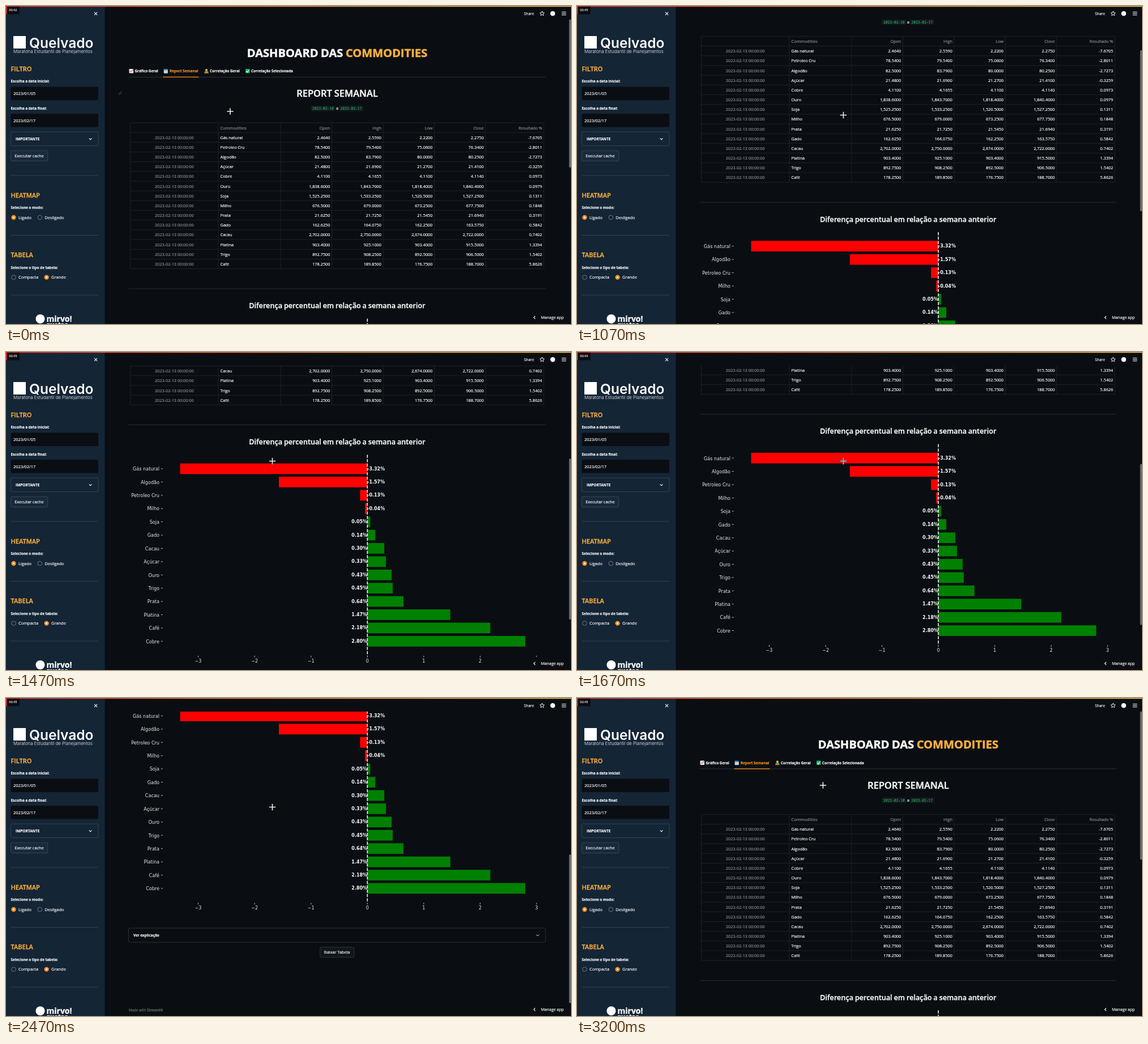
Recreate the animation shown at these times as an HTML page. Size 998 px wide and 561 px high, loop 3.26 s.

```html
<!DOCTYPE html>
<html lang="pt">
<head>
<meta charset="utf-8">
<title>Dashboard das Commodities</title>
<style>
html, body { margin: 0; width: 100%; height: 100%; overflow: hidden; background: #0a0e12 }
svg { display: block; width: 100%; height: 100% }
text { font-family: "Open Sans", "Noto Sans", sans-serif; white-space: pre; word-spacing: -.035em; color: #fafafa }
text, tspan { fill: currentColor; stroke: currentColor; stroke-width: .025em }
.plot, .geo { stroke: none; word-spacing: 0 }
.plot { font-family: "DejaVu Sans", sans-serif }
.mono { font-family: "Noto Sans Mono", monospace }
.geo { font-family: Inter, sans-serif }
#cursor { mix-blend-mode: difference }
</style>
</head>
<body>
<svg viewBox="0 0 998 561">
  <rect width="998" height="561" fill="#0a0e12"/>
  <g id="page"></g>
  <rect id="thumb" x="994.6" y="1" width="3.4" height="284" rx="1.5" fill="#6b6e71"/>
  <g id="frame"></g>
  <path id="cursor" d="M-5.7 0H5.7M0-5.7V5.7" stroke="#fff" stroke-width="1.6"/>
</svg>
<script>
const BG = '#0a0e12', ORANGE = '#ffb13c', ACCENT = '#ff8f22', WHITE = '#fafafa', GRAY = '#8b8f94';
const $ = id => document.getElementById(id);
let out = '';

// y is the middle of the capital letters
const text = (x, y, str, size = 7.4, attrs = '') =>
  out += `<text x="${x}" y="${y + size * .36}" font-size="${size}" ${attrs}>${str}</text>`;
const rect = (x, y, w, h, fill, attrs = '') =>
  out += `<rect x="${x}" y="${y}" width="${w}" height="${h}" fill="${fill}" ${attrs}/>`;
const path = (d, stroke = WHITE, width = 1, attrs = '') =>
  out += `<path d="${d}" fill="none" stroke="${stroke}" stroke-width="${width}" ${attrs}/>`;
const dot = (x, y, r, fill, attrs = '') =>
  out += `<circle cx="${x}" cy="${y}" r="${r}" fill="${fill}" ${attrs}/>`;
const flush = id => { $(id).innerHTML = out; out = ''; };

const ink = color => `style="color:${color}" `;
const bold = 'font-weight="700" ', semi = 'font-weight="600" ';
const middle = 'text-anchor="middle" ', end = 'text-anchor="end" ';
const box = (x, y, w, h, color = 'none') =>
  rect(x, y, w, h, color, 'rx="2" stroke="#fff" stroke-opacity=".2" stroke-width=".7"');

function drawTabs() {
  path('M216.5 125.5H953', '#30343a', .9);
  path('M277.5 125.3H340.5', ACCENT, 1.2);
  rect(217.5, 111, 7.6, 7.6, '#e6e9ec', 'rx=".8"');
  path('M218.5 117l2-2.5 1.5 1 2.5-3.5', '#d8323c', 1);
  rect(278.7, 111.5, 7.2, 7.2, '#c4d6e4', 'rx="1"');
  rect(278.7, 111.3, 7.2, 2.2, '#4b87b5', 'rx=".8"');
  dot(354, 113, 2, '#f5c13d');
  rect(351, 114.6, 6, 2.3, '#4a9a69', 'rx="1"');
  rect(350.2, 116.8, 7.6, 1.9, '#c98b35', 'rx=".6"');
  rect(423, 111, 7.6, 7.6, '#16b364', 'rx="1"');
  path('M424.5 115l1.7 1.8 3-3.8', '#fff', 1.1);
  text(227.5, 115, 'Gráfico Geral', 6.38, bold);
  text(289, 115, 'Report Semanal', 6.38, bold + ink(ACCENT));
  text(360, 115, 'Correlação Geral', 6.38, bold);
  text(433, 115, 'Correlação Selecionada', 6.38, bold);
}

const rows = `Commodities|Open|High|Low|Close|Resultado %
Gás natural|2.4640|2.5590|2.2200|2.2750|-7.6705
Petroleo Cru|78.5400|79.5400|75.0600|76.3400|-2.8011
Algodão|82.5000|83.7900|80.0000|80.2500|-2.7273
Açúcar|21.4800|21.6900|21.2700|21.4100|-0.3259
Cobre|4.1100|4.1655|4.1100|4.1140|0.0973
Ouro|1,838.6000|1,843.7000|1,818.4000|1,840.4000|0.0979
Soja|1,525.2500|1,533.2500|1,520.5000|1,527.2500|0.1311
Milho|676.5000|679.0000|673.2500|677.7500|0.1848
Prata|21.6250|21.7250|21.5450|21.6940|0.3191
Gado|162.6250|164.0750|162.2500|163.5750|0.5842
Cacau|2,702.0000|2,750.0000|2,674.0000|2,722.0000|0.7402
Platina|903.4000|925.1000|903.4000|915.5000|1.3394
Trigo|892.7500|908.2500|892.5000|906.5000|1.5402
Café|178.2500|189.8500|176.7500|188.7000|5.8626`.split('\n').map(r => r.split('|'));

function drawTable() {
  const edges = [219.5, 375, 485, 575.5, 666, 756.5, 847, 950], top = 206, step = 17.17;
  const bottom = top + step * rows.length;
  edges.forEach(x => path(`M${x} ${top}V${bottom}`, '#262a2f', .7));
  for (let i = 0; i <= rows.length; i++) path(`M219.5 ${top + i * step}H950`, '#262a2f', .7);
  rows.forEach((row, i) => {
    const y = top + (i + .52) * step;
    if (i) text(297.3, y, '2023-02-13 00:00:00', 7.33, middle + ink(GRAY));
    row.forEach((cell, j) => {
      const color = i ? '' : ink(GRAY);
      if (j) text(edges[j + 2] - 3, y, cell, 7.35, end + color);
      else text(378.5, y, cell, 7.45, color);
    });
  });
}

const bars = [['Gás natural', -3.32], ['Algodão', -1.57], ['Petroleo Cru', -.13], ['Milho', -.04], ['Soja', .05],
  ['Gado', .14], ['Cacau', .3], ['Açúcar', .33], ['Ouro', .43], ['Trigo', .45], ['Prata', .64],
  ['Platina', 1.47], ['Café', 2.18], ['Cobre', 2.8]];

function drawChart() {
  const zero = 638.3, unit = 99.6, rowY = i => 576.2 + i * 23.41;
  bars.forEach(([name, v], i) => {
    const w = Math.abs(v) * unit;
    rect(v < 0 ? zero - w : zero, rowY(i) - 9.35, w, 18.7, v < 0 ? '#f00' : '#008000');
    text(271, rowY(i) + .4, name, 8.1, end + 'class="plot" ' + ink('#e8e8e8'));
    path(`M273.8 ${rowY(i)}h3`, '#e8e8e8', .8);
  });
  path(`M${zero} 551.6V906`, '#fff', 1.5, 'stroke-dasharray="5.4 2.3"');
  bars.forEach(([, v], i) =>
    text(zero - .2, rowY(i) - .3, v.toFixed(2) + '%', 8, bold + 'class="plot" ' + (v > 0 ? end : '')));
  for (let v = -3; v <= 3; v++) {
    const x = zero + v * unit;
    path(`M${x} 906v3`, '#e8e8e8', .8);
    text(x, 914.9, String(v).replace('-', '−'), 8.1, middle + 'class="plot" ' + ink('#e8e8e8'));
  }
}

function drawPage() {
  text(585, 82.4, `DASHBOARD DAS <tspan ${ink(ORANGE)}>COMMODITIES</tspan>`, 20.08, bold + middle);
  drawTabs();
  text(585, 154.3, 'REPORT SEMANAL', 16.5, semi + middle);
  for (const [x, day] of [[560, 10], [609.5, 17]]) {
    rect(x - 21.3, 176, 42.6, 9.4, '#151b20', 'rx="1.5"');
    text(x, 181, '2023-02-' + day, 6.3, middle + 'class="mono" ' + ink('#25a35a'));
  }
  text(585, 180.8, 'a', 7.4, middle);
  out += '<g id="anchor" transform="rotate(-45 201.5 154)">';
  for (const x of [198.4, 201.2]) rect(x, 152.8, 3.6, 2.4, 'none', 'rx="1.2" stroke="#45494e" stroke-width=".8"');
  out += '</g>';
  drawTable();
  path('M216.5 498.8H953', '#30343a', .8);
  text(585, 528.8, 'Diferença percentual em relação a semana anterior', 12.68, semi + middle);
  drawChart();
  out += '<g id="expand">';
  dot(967.5, 553, 9.5, '#1a1e24');
  path('M965 550.5l5 5M967.5 555.9h2.9v-2.9M967.5 550.1h-2.9v2.9', '#c9cccf', .9);
  out += '</g>';
  box(216.5, 950.7, 736.5, 25);
  text(225, 963.2, 'Ver explicação', 6.42, bold);
  path('M936.8 962.2l2.3 2.3 2.3-2.3');
  box(554.8, 984.2, 60, 18, '#11161b');
  text(584.8, 993.4, 'Baixar Tabela', 7.43, middle);
  text(216.5, 1095.7, 'Made with <tspan font-weight="600">Streamlit</tspan>', 6.4, ink('#6d7175'));
  flush('page');
}

function radio(x, y, label, on) {
  if (on) { dot(x, y, 4.2, ACCENT); dot(x, y, 1.6, '#fff'); }
  else dot(x, y, 3.8, '#142536', 'stroke="#75818c" stroke-width=".9"');
  text(x + 8.5, y, label, 7.45);
}

function drawSidebar() {
  rect(0, 0, 174.6, 561, '#142536');
  path('M156 10.9l5.2 5.2M161.2 10.9l-5.2 5.2', WHITE, 1.1);
  rect(13, 53, 22, 22, '#fff');
  text(41, 65, 'Quelvado', 24.5, semi + 'class="geo"');
  text(13, 79.8, 'Maratona Estudantil de Planejamentos', 7.9, 'class="geo" font-weight="300"');

  const heading = (y, str) => text(8.5, y, str, 11, semi + ink(ORANGE));
  const label = (y, str) => text(8.5, y, str, 6.45, bold);
  heading(111, 'FILTRO');
  label(132.8, 'Escolha a data inicial:');
  rect(8.5, 142.5, 154.5, 23.5, BG, 'rx="2"');
  text(13, 154.5, '2023/01/05');
  label(180.7, 'Escolha a data final:');
  rect(8.5, 190, 154.5, 23.5, BG, 'rx="2"');
  text(13, 202.2, '2023/02/17');
  box(8.5, 222, 154.5, 24.5);
  text(17, 234.6, 'IMPORTANTE', 6.5, bold);
  path('M146.8 233.4l2.3 2.3 2.3-2.3', WHITE, 1.1);
  box(8.5, 255.2, 65.2, 18.3, '#182a3b');
  text(41, 264.6, 'Executar cache', 7.45, middle);
  for (const y of [299, 404.5, 510]) path(`M8.5 ${y}H163`, '#3b4956', .8);
  heading(333.7, 'HEATMAP');
  label(355.7, 'Selecione o modo:');
  radio(13.5, 373, 'Ligado', true);
  radio(59.8, 373, 'Desligado', false);
  heading(439.3, 'TABELA');
  label(461.7, 'Selecione o tipo de tabela:');
  radio(13.5, 478.6, 'Compacta', false);
  radio(71.6, 478.6, 'Grande', true);
  dot(60.5, 552, 8, '#fff');
  text(71.5, 551.5, 'mirvo!', 14, bold);
  text(90, 562, 'quotas', 11, bold + middle);
}

function drawFrame() {
  rect(174.6, 0, 823.4, 24, BG);
  rect(922, 538, 76, 23, BG);
  drawSidebar();
  out += `<linearGradient id="strip"><stop stop-color="#f53038"/><stop offset=".35" stop-color="#f47a35"/>
    <stop offset="1" stop-color="#f6c94f"/></linearGradient>`;
  rect(0, 0, 998, 1.3, 'url(#strip)');
  rect(0, 1, 24, 13.5, '#0b0d10');
  rect(0, 0, 1.6, 14.5, '#e0262e');
  text(5.2, 7.2, '', 5.6, 'id="clock"');

  text(915, 13.4, 'Share', 6.6);
  let star = '';
  for (let i = 0; i < 10; i++) {
    const r = i % 2 ? 1.9 : 4.3, a = i * Math.PI / 5;
    star += (i ? 'L' : 'M') + (947 + r * Math.sin(a)) + ' ' + (13.4 - r * Math.cos(a));
  }
  path(star + 'Z', WHITE, .9);
  dot(965.7, 13.3, 4.3, WHITE);
  path('M981.6 10.7h7.8M981.6 13.3h7.8M981.6 15.9h7.8', WHITE, 1);
  path('M934.8 546.9l-2.6 2.6 2.6 2.6', WHITE, 1.1);
  text(945, 549.4, 'Manage app', 7);
  flush('frame');
}

// Keys are [tick, value...] with 15 ticks per second
const LOOP = 3260, TICK = 1000 / 15;
const scrollKeys = [[13, 0], [15, 90], [17, 215], [19, 315.3], [21, 364], [25, 389], [30, 400], [34, 515],
  [37, 544.7], [40, 544.7], [41, 428], [43, 222], [45, 85], [47, 12], [48, .5]];
const cursorKeys = [[0, 396, 186], [3, 430, 190], [6, 461, 193], [9, 470.5, 193], [12, 470.5, 192.5],
  [44, 470.5, 192.5], [46, 458, 178], [48, 434.5, 154]];

function at(keys, k) {
  const i = keys.findIndex(key => key[0] > k);
  if (i === 0) return keys[0].slice(1);
  if (i < 0) return keys[keys.length - 1].slice(1);
  const a = keys[i - 1], b = keys[i], u = (k - a[0]) / (b[0] - a[0]);
  return a.slice(1).map((v, j) => v + (b[j + 1] - v) * u);
}

function draw(now) {
  const k = Math.floor((now % LOOP) / TICK + .001);
  const [scroll] = at(scrollKeys, k), [x, y] = at(cursorKeys, k);
  $('page').setAttribute('transform', `translate(0 ${-scroll})`);
  $('thumb').setAttribute('y', 1 + scroll * .505);
  $('cursor').setAttribute('transform', `translate(${x} ${y})`);
  $('anchor').setAttribute('visibility', k < 3 ? 'visible' : 'hidden');
  $('expand').setAttribute('visibility', k > 40 && k < 46 ? 'visible' : 'hidden');
  $('clock').textContent = '00:' + (42 + (k >= 14) + (k >= 24) + (k >= 35));
}

drawPage();
drawFrame();
const start = performance.now();
(function loop() {
  draw(performance.now() - start);
  requestAnimationFrame(loop);
})();
</script>
</body>
</html>
```
